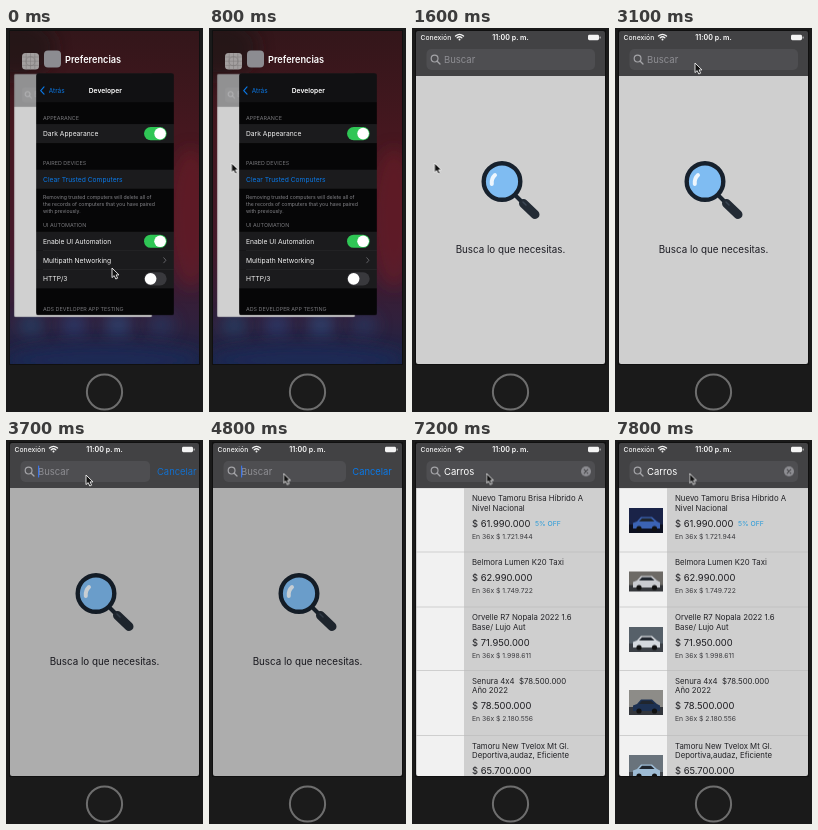
Animation, 197 px wide and 384 px high, one loop 8 s. Source, as an HTML page:

```html
<!DOCTYPE html>
<html lang="es">
<head>
<meta charset="utf-8">
<title>Buscador</title>
<style>
  html, body { margin: 0; width: 100%; height: 100%; overflow: hidden; background: #1a1a1a; }
  svg { display: block; width: 100vw; height: 100vh; }
  text { font-family: Inter, Roboto, "Liberation Sans", sans-serif; white-space: pre; }
</style>
</head>
<body>
<svg id="stage" viewBox="0 0 197 384"></svg>
<script>
const LOOP = 8000;
const BLUE = '#0a78e6';
const stage = document.getElementById('stage');

// Markup helpers
const rect = (x, y, w, h, fill, rx = 0, more = '') =>
  `<rect x="${x}" y="${y}" width="${w}" height="${h}" rx="${rx}" fill="${fill}" ${more}/>`;
const circle = (x, y, r, fill, more = '') =>
  `<circle cx="${x}" cy="${y}" r="${r}" fill="${fill}" ${more}/>`;
const line = (d, stroke, width, more = '') =>
  `<path d="${d}" fill="none" stroke="${stroke}" stroke-width="${width}" stroke-linecap="round" stroke-linejoin="round" ${more}/>`;
const text = (x, y, size, fill, s, more = '') =>
  `<text x="${x}" y="${y}" font-size="${size}" fill="${fill}" ${more}>${s}</text>`;
const group = (id, body, more = '') => `<g id="${id}" ${more}>${body}</g>`;

// Settings card, 189 x 332
const label = (y, s) => text(9.6, y, 7.4, '#77777b', s);
const row = (y, s, fill = '#f2f2f2') =>
  rect(0, y - 13, 189, 26, '#1b1b1d') + text(9.6, y + 3.3, 9.2, fill, s);
const toggle = (y, on) =>
  rect(148, y - 9, 31, 18, on ? '#2fc655' : '#39393d', 9) + circle(on ? 170 : 157, y, 8, '#fff');

const settings =
  rect(0, 0, 189, 332, '#060607') + rect(0, 0, 189, 40, '#111113') +
  line('M11 19 L6.5 24 L11 29', BLUE, 1.6) +
  text(17.5, 27.2, 8.8, BLUE, 'Atrás') +
  text(95, 27.2, 9.2, '#fff', 'Developer', 'text-anchor="middle" font-weight="600"') +
  label(64.5, 'APPEARANCE') +
  row(83, 'Dark Appearance') + toggle(83, true) +
  label(126.5, 'PAIRED DEVICES') +
  row(145.5, 'Clear Trusted Computers', BLUE) +
  ['Removing trusted computers will delete all of',
   'the records of computers that you have paired',
   'with previously.'].map((s, i) => text(9.6, 172 + i * 9.8, 7, '#85858a', s)).join('') +
  label(211.5, 'UI AUTOMATION') +
  row(230.5, 'Enable UI Automation') + row(256.5, 'Multipath Networking') + row(282, 'HTTP/3') +
  rect(9.6, 243.3, 180, .5, '#38383b') + rect(9.6, 269, 180, .5, '#38383b') +
  toggle(230.5, true) + toggle(282, false) +
  line('M175 253 L178 256.5 L175 260', '#6a6a6e', 1.2) +
  label(326, 'ADS DEVELOPER APP TESTING');

// Result rows: top, title lines, price, installments, thumbnail tones
const rows = [
  [48, ['Nuevo Tamoru Brisa Híbrido A', 'Nivel Nacional'], '61.990.000', '1.721.944', ['#1a2348', '#0d1020', '#3b63b4']],
  [112, ['Belmora Lumen K20 Taxi'], '62.990.000', '1.749.722', ['#6d6a66', '#35373b', '#c9cbd0']],
  [167, ['Orvelle R7 Nopala 2022 1.6', 'Base/ Lujo Aut'], '71.950.000', '1.998.611', ['#566069', '#3c4046', '#d5d9de']],
  [230.5, ['Senura 4x4\u00a0 $78.500.000', 'Año 2022'], '78.500.000', '2.180.556', ['#8d8c88', '#33363c', '#1d3152']],
  [295.5, ['Tamoru New Tvelox Mt Gl.', 'Deportiva,audaz, Eficiente'], '65.700.000', '1.825.000', ['#69737c', '#40444a', '#9dbbd4']]
];
const thumb = (y, h, [back, floor, body]) => `<g class="thumb" transform="translate(14 ${y})">` +
  rect(0, 0, 34, h, back) + rect(0, h * .68, 34, h * .32, floor) +
  `<path transform="translate(0 ${h - 21})" d="M4 17 V11.5 L8 10 L12 5.5 H23 L28 10 L31 11.5 V17 Z" fill="${body}"/>` +
  `<path transform="translate(0 ${h - 21})" d="M10 10 L13 6.7 H22 L25.5 10 Z" fill="#20262e"/>` +
  circle(10, h - 4, 2.6, '#111') + circle(25.5, h - 4, 2.6, '#111') + '</g>';

const list = rect(4, 48, 189, 288, '#cfcfcf') + rect(5, 48, 47, 288, '#f1f1f1') +
  rows.map(([top, title, price, part, tones], i) => {
    const y = top + (title.length > 1 ? 13 : 13);
    const end = y + (title.length - 1) * 9.6;
    return rect(4, top - .3, 189, .6, '#b9b9b9') +
      thumb(top + 19.5, title.length > 1 ? 25 : 20, tones) +
      title.map((s, n) => text(60, y + n * 9.6, 7.8, '#222226', s)).join('') +
      text(60, end + 16, 9.4, '#1c1c20', '$ ' + price) +
      (i ? '' : text(123, end + 15.5, 6.8, '#2a9bd8', '5% OFF')) +
      text(60, end + 28, 6.8, '#3a3a3e', 'En 36x $ ' + part);
  }).join('');

// Search card, laid out in stage coordinates
const lens =
  line('M103 167 L110 174', '#1b2530', 4) +
  line('M111.5 175.5 L123 186.5', '#232b35', 9) +
  line('M111 174 L114 177', '#3b4654', 1.5) +
  circle(90, 153.5, 18.3, '#7fbcf2', 'stroke="#17212d" stroke-width="4.4"') +
  line('M79.8 156 A10.5 10.5 0 0 1 83 147', '#eef6fd', 4);

const status = text(8.5, 11.8, 6.8, '#f4f4f4', 'Conexión', 'font-weight="500"') +
  line('M43.5 8 Q47.5 4.6 51.5 8 M45.2 9.8 Q47.5 7.8 49.8 9.8', '#f4f4f4', 1.3) + circle(47.5, 11.6, 1, '#f4f4f4') +
  text(98.5, 11.8, 7.1, '#fff', '11:00 p. m.', 'text-anchor="middle" font-weight="600"') +
  rect(176, 6.8, 11, 5.4, '#f4f4f4', 1.4) + rect(187.6, 8.4, 1, 2.2, '#d0d0d0', .4);

const search =
  rect(4, 3, 189, 333, '#cfcfcf') + lens +
  text(98.5, 224.6, 9.8, '#1d1d24', 'Busca lo que necesitas.', 'text-anchor="middle"') +
  group('dim', rect(4, 48, 189, 288, '#000')) +
  group('list', list) +
  rect(4, 3, 189, 45, '#424244') +
  group('status', status) +
  rect(14.5, 21, 168.5, 21, '#4e4e51', 5, 'id="field"') +
  circle(22.6, 30.6, 3.4, 'none', 'stroke="#a4a4a8" stroke-width="1.2"') +
  line('M25.2 33.2 L28 36', '#a4a4a8', 1.3) +
  group('hint', text(32, 35, 9.5, '#8e8e93', 'Buscar')) +
  `<text id="typed" x="32" y="35" font-size="9.5" fill="#fff">${[...'Carros'].map(c => `<tspan>${c}</tspan>`).join('')}</text>` +
  rect(32, 25.5, 1.2, 12, '#3b74e8', .5, 'id="caret"') +
  group('clear', circle(0, 0, 5, '#8e8e93') + line('M-1.8 -1.8 L1.8 1.8 M1.8 -1.8 L-1.8 1.8', '#4a4a4d', 1.1)) +
  group('cancel', text(143.3, 34.6, 9.4, BLUE, 'Cancelar')) +
  group('haze', rect(4, 3, 189, 333, '#d2d2d2'));

// App switcher backdrop
const glow = (x, y, rx, ry, fill, o) =>
  `<ellipse cx="${x}" cy="${y}" rx="${rx}" ry="${ry}" fill="${fill}" opacity="${o}" filter="url(#blur)"/>`;
const wallpaper = rect(4, 3, 189, 333, 'url(#wall)') +
  glow(185, 190, 24, 70, '#6d1a28', .6) + glow(10, 20, 40, 30, '#1b1718', .6) +
  [[25, '#23507a'], [68, '#2b4a86'], [112, '#2f5a92'], [155, '#27406e']]
    .map(([x, c]) => glow(x, 297, 13, 11, c, .6)).join('') +
  glow(98, 332, 100, 16, '#1b2a58', .8);
const heading = rect(16, 25, 17, 16.5, '#a39f9f', 3.5) +
  line('M20.2 25.5 V41 M24.5 25.5 V41 M28.8 25.5 V41 M16.5 29 H32.5 M16.5 33.2 H32.5 M16.5 37.4 H32.5', '#7d7878', .5) +
  circle(24.5, 33.2, 4.6, 'none', 'stroke="#7d7878" stroke-width=".5"') +
  rect(38, 22.5, 17, 17, '#8c8c91', 4) +
  text(59, 34.6, 9.2, '#fff', 'Preferencias', 'font-weight="600"');

stage.innerHTML = `<defs>
    <linearGradient id="wall" x1="0" y1="0" x2="0" y2="1">
      <stop offset="0" stop-color="#33161a"/><stop offset=".3" stop-color="#45171f"/>
      <stop offset=".65" stop-color="#45192a"/><stop offset=".87" stop-color="#30203c"/>
      <stop offset="1" stop-color="#1b2446"/>
    </linearGradient>
    <filter id="blur" x="-100%" y="-100%" width="300%" height="300%"><feGaussianBlur stdDeviation="8"/></filter>
    <clipPath id="screen"><rect x="4" y="3" width="189" height="333"/></clipPath>
    <clipPath id="cardA"><rect width="189" height="332" rx="4"/></clipPath>
    <clipPath id="cardB"><rect x="4" y="3" width="189" height="333" rx="2"/></clipPath>
  </defs>` +
  rect(0, 0, 197, 384, '#1a1a1a') + rect(3, 2, 191, 335, '#101010') +
  circle(98.5, 364, 17.6, '#1b1b1b', 'stroke="#6e6e6e" stroke-width="2"') +
  `<g clip-path="url(#screen)">` +
    group('wallpaper', wallpaper) + group('heading', heading) +
    group('search', `<g transform="translate(-4 -3)" clip-path="url(#cardB)">${search}</g>`) +
    group('settings', `<g clip-path="url(#cardA)">${settings}</g>`) +
  '</g>' +
  group('pointer', '<path d="M0 0 V9.6 L2.2 7.6 L3.8 11 L5.6 10.2 L4.1 6.9 H7 Z" fill="#111" stroke="#f0f0f0" stroke-width=".9" stroke-linejoin="round"/>');

// Motion: rows of [ms, properties, easing towards the next row]
const OUT = 'ease-out', SOFT = 'ease-in-out', HOLD = 'step-end';
const at = (x, y, s = 1) => ({ transform: `translate(${x}px, ${y}px) scale(${s})` });
const see = opacity => ({ opacity });
const wide = w => ({ width: w + 'px' });

function run(target, steps) {
  const el = typeof target === 'string' ? document.getElementById(target) : target;
  const frames = steps.map(([ms, props, easing = 'linear']) => ({ offset: ms / LOOP, easing, ...props }));
  frames.push({ ...frames[frames.length - 1], offset: 1 });
  el.animate(frames, { duration: LOOP, iterations: Infinity });
}
const flip = (target, ...times) =>
  run(target, [[0, see(0), HOLD], ...times.map((ms, i) => [ms, see(1 - i % 2), HOLD])]);

run('pointer', [[0, at(106, 240)], [100, at(106, 240), SOFT], [750, at(22.5, 135)], [1900, at(22.5, 135), SOFT],
  [2500, at(80, 35)], [4100, at(80, 35), SOFT], [4500, at(74.5, 33.5)]]);

run('settings', [[0, at(30, 45, .73)], [820, at(30, 45, .73)], [1000, at(163, 13, .93), OUT], [1300, at(197, 3, 1)]]);
run('search', [[0, at(8, 46, .73)], [820, at(8, 46, .73)], [1000, at(5, 13, .935), OUT], [1300, at(4, 3, 1)]]);
run('haze', [[0, see(.55)], [820, see(.55)], [1000, see(.08)], [1150, see(0)]]);
run('heading', [[0, { ...at(0, 0), ...see(1) }], [820, { ...at(0, 0), ...see(1) }],
  [1000, { ...at(-6, -32), ...see(.4) }], [1150, { ...at(-8, -40), ...see(0) }]]);
run('wallpaper', [[0, see(1)], [1100, see(1)], [1350, see(0)]]);
run('status', [[0, see(0)], [900, see(0)], [1000, see(.15)], [1300, see(1)]]);

run('dim', [[0, see(0)], [3300, see(0)], [3650, see(.165)], [6100, see(.165)], [6450, see(0)]]);
run('field', [[0, wide(168.5)], [3400, wide(168.5), OUT], [3850, wide(122.5)], [6100, wide(122.5), OUT], [6450, wide(168.5)]]);
const away = { ...at(50, 0), ...see(0) }, shown = { ...at(0, 0), ...see(1) };
run('cancel', [[0, away], [3400, away, OUT], [3850, shown], [6100, shown, OUT], [6450, away]]);

const keys = [4900, 5000, 5200, 5500, 5600, 5800];
const typed = document.getElementById('typed');
[...typed.children].forEach((c, i) =>
  run(c, [[0, { fillOpacity: 0 }, HOLD], [keys[i], { fillOpacity: 1 }, HOLD]]));
run('hint', [[0, see(1), HOLD], [keys[0], see(0), HOLD]]);
flip('clear', keys[0]);
document.getElementById('clear').style.transform = 'translate(128px, 31.4px)';
run('clear', [[0, at(128, 31.4)], [6100, at(128, 31.4), OUT], [6450, at(174, 31.4)]]);
run('caret', [[0, at(0, 0), HOLD],
  ...keys.map((ms, i) => [ms, at(typed.getSubStringLength(0, i + 1), 0), HOLD])]);
flip('caret', 3500, 4150, 4650, 6100);

flip('list', 7200);
document.querySelectorAll('.thumb').forEach((el, i) => flip(el, 7300 + i * 100));
</script>
</body>
</html>
```
